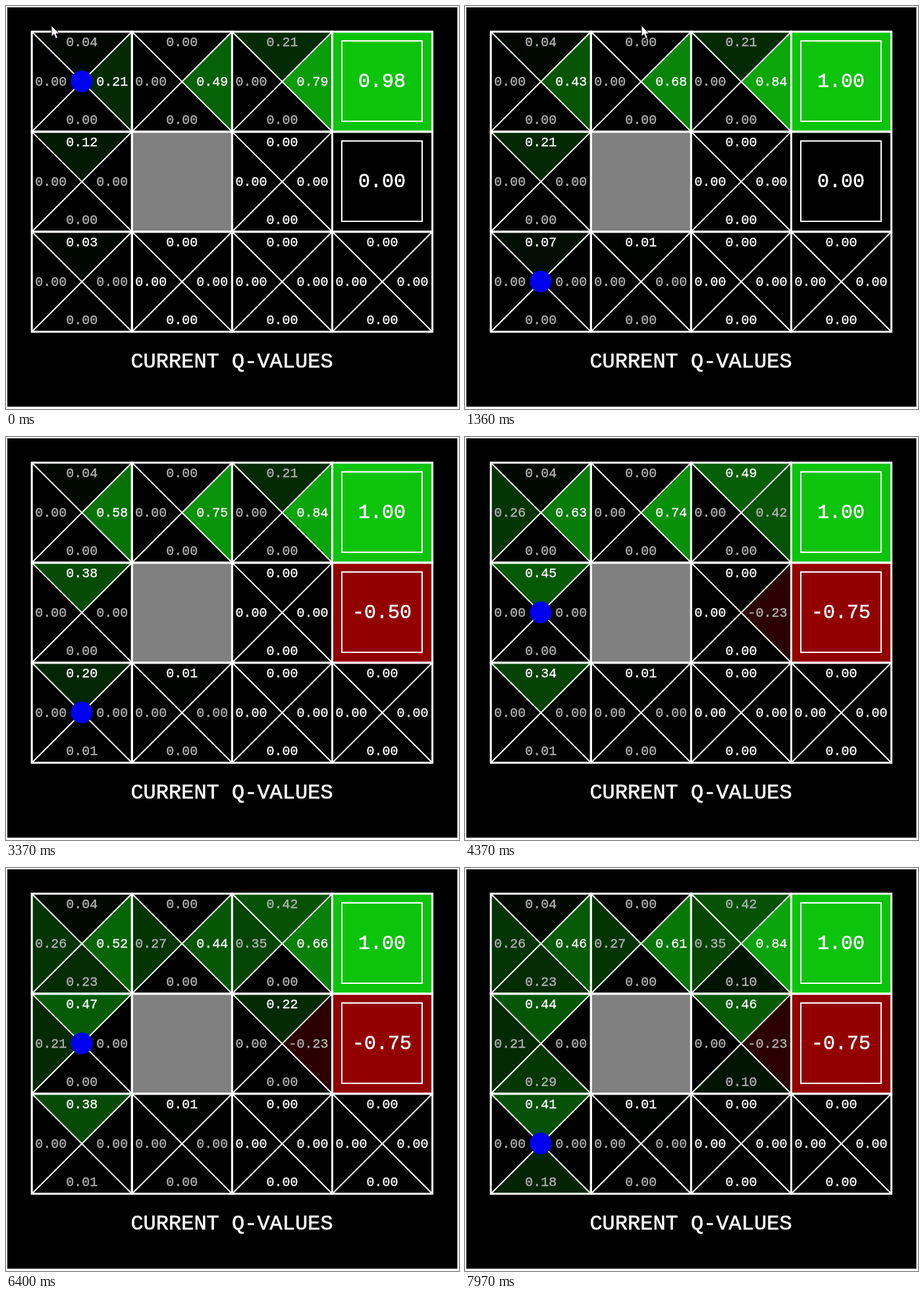
Write an HTML page with a canvas that moves like this. It is 688 px wide and 612 px high and loops after 8 s.

```html
<!DOCTYPE html>
<html lang="en">
<head>
<meta charset="utf-8">
<title>Current Q-values</title>
<style>
  html, body { margin: 0; width: 100%; height: 100%; overflow: hidden; background: #000; }
  canvas { display: block; }
</style>
</head>
<body>
<canvas id="stage" width="688" height="612"></canvas>
<script>
const ctx = document.getElementById('stage').getContext('2d');
const LOOP = 8000, ALPHA = 0.5, GAMMA = 0.9;
const WHITE = '#fff', MUTED = '#b2b2b2', WALL = '#808080', BLUE = '#0000f0';
const PITCH_X = 152.1, PITCH_Y = 151.9, LEFT = 39.2, TOP = 39;
const START = '2,0';
const MOVES = { n: [-1, 0], s: [1, 0], w: [0, -1], e: [0, 1], '-': [0, 0] };

// Each step: chosen action, then the direction really taken ("-" = bumped).
// Xx leaves a terminal square, Rr starts the next episode.
const SEGMENTS = [
  [1360, 'Ee Ee Ee Xx Rr Ee Nw Nn Nn Ee Ee E- Ee Xx Rr'],
  [3370, 'Nn Nn Ee Ee Ee Xx Rr Nn Nn Ee Ee E- E- Ee Xx Rr Se Ee Nn Ne Xx Rr'],
  [4370, 'Nn Nn W- Ee E- Ee N- Es Ee Xx Rr Nn'],
  [5700, 'Nn Es Nn Ss N- N- Nn Ee Ee Ss Nn N- N- Ww Ee Ww'],
  [6400, 'Ww Ee Ee N- Ee Xx Rr Nn W-'],
  [7970, 'Nn Ee Ee Ee Xx Rr Nn S- Ss S- Nn Nn Ee Ee Ss S- Nn Ee Xx Rr']
];

function initialValues() {
  const q = {};
  for (let r = 0; r < 3; r++)
    for (let c = 0; c < 4; c++)
      if (!(r === 1 && c === 1)) q[r + ',' + c] = { N: 0, E: 0, S: 0, W: 0 };
  Object.assign(q['0,0'], { N: 0.04, E: 0.21 });
  Object.assign(q['0,1'], { E: 0.49 });
  Object.assign(q['0,2'], { N: 0.214, E: 0.79 });
  Object.assign(q['1,0'], { N: 0.12 });
  Object.assign(q['2,0'], { N: 0.03 });
  q['0,3'] = { X: 1 - 1 / 64 };
  q['1,3'] = { X: 0 };
  return q;
}

const best = cell => Math.max(...Object.values(cell));

function learn({ q, at }, [action, result]) {
  if (action === 'R') return { q, at: START };
  const old = q[at][action];
  let next = null, target;
  if (action === 'X') {
    target = at === '0,3' ? 1 : -1;
  } else {
    const [r, c] = at.split(',').map(Number), [dr, dc] = MOVES[result];
    next = (r + dr) + ',' + (c + dc);
    target = GAMMA * best(q[next]);
  }
  const value = (1 - ALPHA) * old + ALPHA * target;
  return { q: { ...q, [at]: { ...q[at], [action]: value } }, at: next };
}

function buildTimeline() {
  let state = { q: initialValues(), at: '0,0' }, begin = 0;
  const line = [{ ...state, time: 0 }];
  for (const [end, script] of SEGMENTS) {
    const steps = script.split(' ');
    steps.forEach((step, i) => {
      state = learn(state, step);
      line.push({ ...state, time: begin + (end - begin) * (i + 0.5) / steps.length });
    });
    begin = end;
  }
  return line;
}

function polygon(points, fill) {
  ctx.beginPath();
  points.forEach(([x, y]) => ctx.lineTo(x, y));
  ctx.closePath();
  ctx.fillStyle = fill;
  ctx.fill();
}

function segment(x1, y1, x2, y2) {
  ctx.beginPath();
  ctx.moveTo(x1, y1);
  ctx.lineTo(x2, y2);
  ctx.stroke();
}

// Regular weight with a hairline outline gives a medium stroke.
function label(text, x, baseline, size, color = WHITE) {
  ctx.font = `${size}px "Liberation Mono", monospace`;
  ctx.textAlign = 'center';
  ctx.fillStyle = ctx.strokeStyle = color;
  ctx.lineWidth = size / 50;
  ctx.fillText(text, x, baseline);
  ctx.strokeText(text, x, baseline);
}

function agent(x, y) {
  ctx.beginPath();
  ctx.arc(x - 0.3, y - 0.5, 16.5, 0, Math.PI * 2);
  ctx.fillStyle = BLUE;
  ctx.fill();
}

function drawCell(key, cell, current, shade) {
  const [r, c] = key.split(',').map(Number);
  const x0 = LEFT + c * PITCH_X, y0 = TOP + r * PITCH_Y;
  const x1 = x0 + PITCH_X, y1 = y0 + PITCH_Y;
  const cx = (x0 + x1) / 2, cy = (y0 + y1) / 2;
  ctx.strokeStyle = WHITE;
  ctx.lineWidth = 2;

  if ('X' in cell) {
    ctx.fillStyle = shade(cell.X);
    ctx.fillRect(x0, y0, PITCH_X, PITCH_Y);
    ctx.strokeRect(Math.floor(cx - 61), Math.floor(cy - 61), 122, 122);
    if (current) agent(cx, cy);
    label(cell.X.toFixed(2), cx - 0.5, cy + 8, 30);
    return;
  }

  const a = [x0, y0], b = [x1, y0], d = [x1, y1], e = [x0, y1], mid = [cx, cy];
  polygon([a, b, mid], shade(cell.N));
  polygon([b, d, mid], shade(cell.E));
  polygon([d, e, mid], shade(cell.S));
  polygon([e, a, mid], shade(cell.W));
  segment(x0, y0, x1, y1);
  segment(x1, y0, x0, y1);
  if (current) agent(cx, cy);

  const top = best(cell);
  const spots = { N: [0, -54], E: [46, 6], S: [0, 64.5], W: [-47, 6] };
  for (const dir in spots) {
    const text = cell[dir].toFixed(2), [dx, dy] = spots[dir];
    const shift = text.length > 4 ? -6 : 0;
    label(text, cx + dx + shift, cy + dy, 20, cell[dir] === top ? WHITE : MUTED);
  }
}

function drawPointer(time) {
  if (time > 2000) return;
  const p = Math.min(1, Math.max(0, (time - 100) / 950));
  ctx.save();
  ctx.translate(69 + 199 * p * p * (3 - 2 * p), 29.5);
  ctx.beginPath();
  [[0, 0], [0, 17], [4, 13.5], [6.5, 20], [9.5, 18.8], [7, 12.5], [12, 12.5]]
    .forEach(([x, y]) => ctx.lineTo(x, y));
  ctx.closePath();
  ctx.fillStyle = '#fff';
  ctx.fill();
  ctx.strokeStyle = '#000';
  ctx.lineWidth = 1;
  ctx.stroke();
  ctx.restore();
}

const timeline = buildTimeline();

function draw(time) {
  const { q, at } = timeline.findLast(s => s.time <= time);
  const values = Object.values(q).flatMap(Object.values);
  const low = Math.min(...values), high = Math.max(...values);
  const shade = v => {
    if (v < 0) return `rgb(${147 * v / low},0,0)`;
    const k = v / high;
    return `rgb(${12 * k},${196 * k},${12 * k})`;
  };

  ctx.fillStyle = WHITE;
  ctx.fillRect(0, 0, 688, 612);
  ctx.fillStyle = '#000';
  ctx.fillRect(2, 2, 683.5, 606.5);

  ctx.fillStyle = WALL;
  ctx.fillRect(LEFT + PITCH_X, TOP + PITCH_Y, PITCH_X, PITCH_Y);
  for (const key in q) drawCell(key, q[key], key === at, shade);

  ctx.strokeStyle = WHITE;
  ctx.lineWidth = 3;
  for (let r = 0; r < 3; r++)
    for (let c = 0; c < 4; c++)
      ctx.strokeRect(LEFT + c * PITCH_X, TOP + r * PITCH_Y, PITCH_X, PITCH_Y);

  label('CURRENT Q-VALUES', 343, 549, 32);
  drawPointer(time);
}

const origin = performance.now();
function tick() {
  draw((performance.now() - origin) % LOOP);
  requestAnimationFrame(tick);
}
tick();
</script>
</body>
</html>
```
